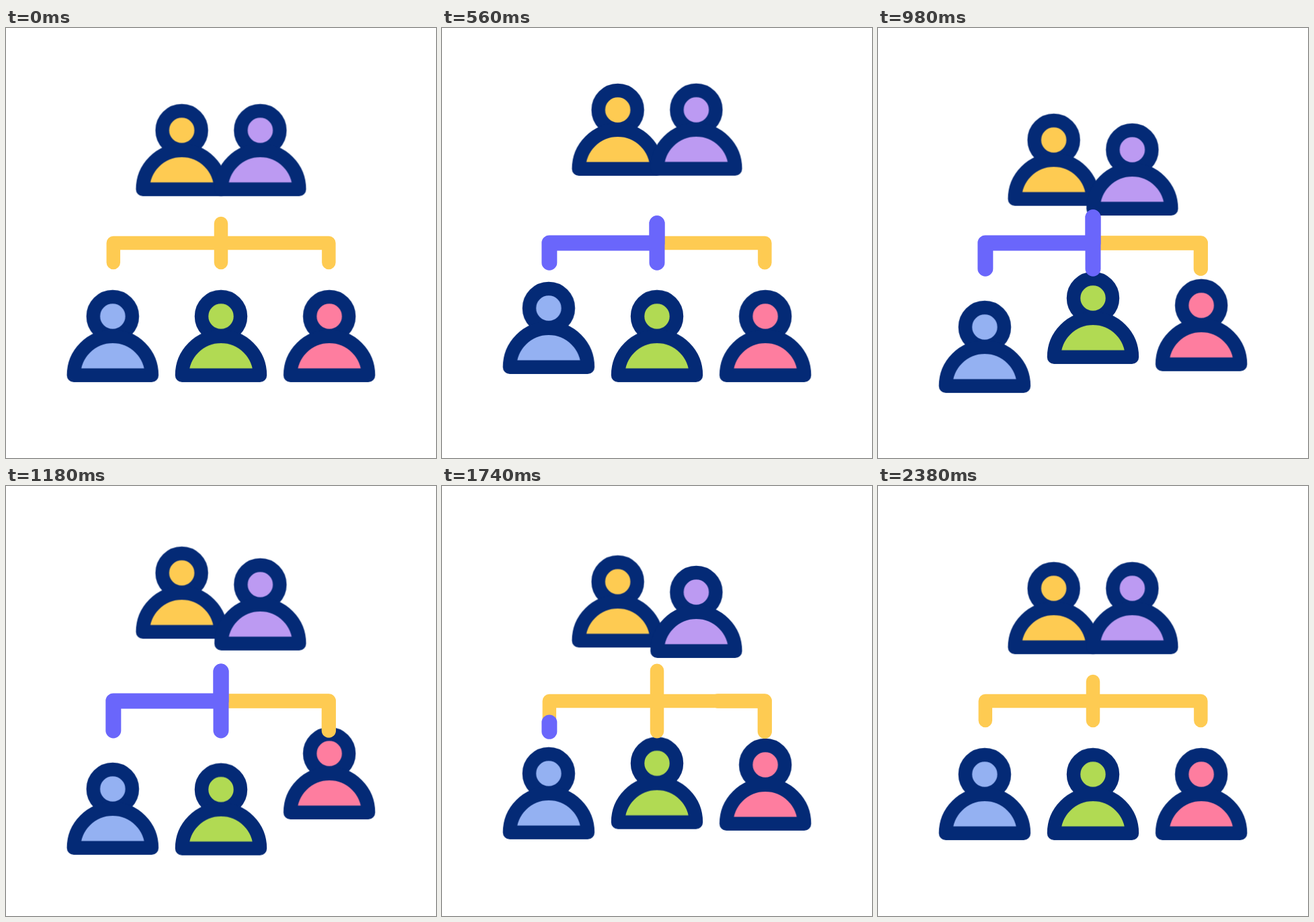
Recreate the animation shown at these times as an HTML page. Size 640 px wide and 640 px high, loop 2400 ms.

```html
<!DOCTYPE html>
<html lang="en">
<head>
<meta charset="utf-8">
<title>Team hierarchy</title>
<style>
  html, body { margin: 0; width: 100%; height: 100%; overflow: hidden; background: #fff; }
  svg { display: block; width: 100%; height: 100%; }

  .person {
    stroke: #042a76;
    stroke-width: 20.5;
    stroke-linejoin: round;
    animation: 2400ms cubic-bezier(.333, 0, .667, 1) infinite;
    animation-delay: var(--start);
  }
  .lead { animation-name: lead; }
  .member { animation-name: member; }

  @keyframes lead {
    0% { transform: translateY(0); }
    12.5% { transform: translateY(-34px); }
    27.08% { transform: translateY(29px); }
    41.67% { transform: translateY(-24px); }
    54.38% { transform: translateY(15.5px); }
    67.08% { transform: translateY(-15px); }
    81.67%, 100% { transform: translateY(0); }
  }
  @keyframes member {
    0% { transform: translateY(0); }
    12.5% { transform: translateY(-34px); }
    27.08% { transform: translateY(31px); }
    41.67% { transform: translateY(-24px); }
    56.25%, 100% { transform: translateY(0); }
  }

  .line {
    d: var(--rest);
    fill: none;
    stroke: #fecb52;
    stroke-width: 20.5;
    stroke-linecap: round;
    stroke-linejoin: round;
    animation: stretch 2400ms cubic-bezier(.333, 0, .667, 1) infinite;
  }
  .flow {
    stroke-dasharray: 1 2;
    animation-name: stretch, var(--trim);
  }
  .violet { stroke: #6a66fb; stroke-width: 23; }

  @keyframes stretch {
    0%, 21.25% { d: var(--rest); }
    62.9% { d: var(--long); }
    98.3%, 100% { d: var(--rest); }
  }
  /* Each flow line is drawn from the top, held, then erased from the top. */
  @keyframes left {
    0%, .4% { stroke-dashoffset: 1; visibility: hidden; }
    20%, 55% { stroke-dashoffset: 0; visibility: visible; }
    75.4%, 100% { stroke-dashoffset: -1; visibility: hidden; }
  }
  @keyframes middle {
    0%, 10.8% { stroke-dashoffset: 1; visibility: hidden; }
    23.1%, 55.4% { stroke-dashoffset: 0; visibility: visible; }
    67.9%, 100% { stroke-dashoffset: -1; visibility: hidden; }
  }
  @keyframes right {
    0%, 22% { stroke-dashoffset: 1; visibility: hidden; }
    40.8%, 62% { stroke-dashoffset: 0; visibility: visible; }
    82%, 100% { stroke-dashoffset: -1; visibility: hidden; }
  }
  #flow-left { animation-name: stretch, left; }
  #flow-middle { animation-name: stretch, middle; }
  #flow-right { animation-name: stretch, right; }
</style>
</head>
<body>
<svg viewBox="0 0 640 640">
  <defs>
    <g id="person">
      <circle r="29"/>
      <path d="M-58 87.7A58 58 0 0 1 58 87.7Z"/>
    </g>
  </defs>

  <use class="person lead" href="#person" x="261.6" y="152.3" fill="#fecb52" style="--start:210ms"/>
  <use class="person lead" href="#person" x="378.4" y="152.3" fill="#bc9af2" style="--start:320ms"/>
  <use class="person member" href="#person" x="158.8" y="429.1" fill="#94b1f2" style="--start:440ms"/>
  <use class="person member" href="#person" x="320" y="429.1" fill="#b1da53" style="--start:610ms"/>
  <use class="person member" href="#person" x="481.2" y="429.1" fill="#fe7d9f" style="--start:835ms"/>

  <path class="line" style="--rest:path('M159.8 349V320H480.4V349M320 291V349');--long:path('M159.8 369V320H480.4V369M320 271V369')"/>
  <path class="line flow" id="flow-right" pathLength="1" stroke-width="21" style="--rest:path('M320 291V320H480.4V349');--long:path('M320 271V320H480.4V369');stroke-width:21.3"/>
  <path class="line flow violet" id="flow-left" pathLength="1" style="--rest:path('M320 291V320H159.8V349');--long:path('M320 271V320H159.8V369')"/>
  <path class="line flow violet" id="flow-middle" pathLength="1" style="--rest:path('M320 291V320V349');--long:path('M320 271V320V369')"/>
</svg>
</body>
</html>
```
